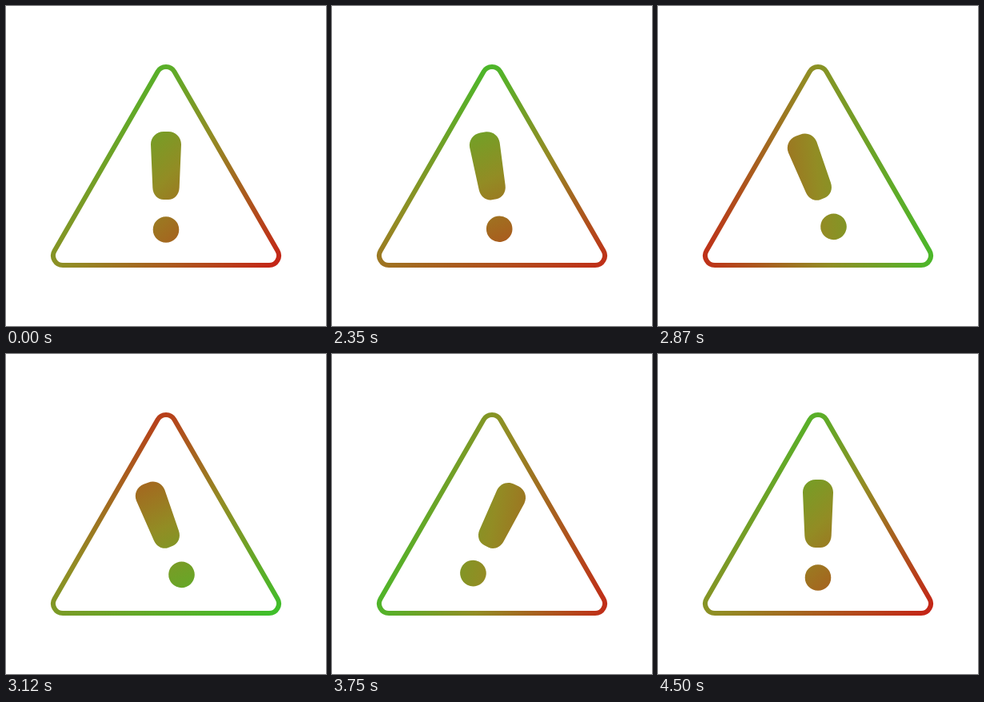
An HTML page with a canvas for the animation above (4.52 s loop, 400 by 400 pixels).

```html
<!DOCTYPE html>
<html lang="en">
<head>
<meta charset="utf-8">
<title>Warning</title>
<style>
  html, body { margin: 0; width: 100%; height: 100%; overflow: hidden; background: #fff; }
  canvas { display: block; width: 400px; height: 400px; }
</style>
</head>
<body>
<canvas id="stage" width="400" height="400"></canvas>
<script>
const ctx = document.getElementById('stage').getContext('2d');
const LOOP = 4520, START = 1995, LENGTH = 2500;
const CENTER = [200, 215], REACH = 182, PIVOT = [200, 226];

const triangle = new Path2D(
  'M71 324H329A12 12 0 0 0 339.4 306L210.4 82A12 12 0 0 0 189.6 82L60.6 306A12 12 0 0 0 71 324Z');
const mark = new Path2D(
  'M197 157H203C212 157 219 164 219 173L216.7 227C216.4 236 210 242 203 242' +
  'H197C190 242 183.6 236 183.3 227L181 173C181 164 188 157 197 157Z');
mark.moveTo(216.3, 279.5);
mark.arc(200, 279.5, 16.3, 0, 2 * Math.PI);

// Swing keys: [ms since the start, degrees]
const keys = [[0, 0]];
for (let i = 0; i < 8; i++) keys.push([158 + 250 * i, -30], [274 + 250 * i, 30]);
keys.push([2160, -16], [2290, 0], [LENGTH, 0]);

const smooth = t => t * t * (3 - 2 * t);

function swing(ms) {
  const i = keys.findIndex(key => key[0] >= ms);
  if (i < 1) return 0;
  const [t0, a0] = keys[i - 1], [t1, a1] = keys[i];
  return a0 + (a1 - a0) * smooth((ms - t0) / (t1 - t0));
}

// cubic-bezier(.4, 0, .4, 1)
function ease(x) {
  let low = 0, high = 1;
  for (let i = 0; i < 20; i++) {
    const s = (low + high) / 2;
    if (1.2 * s * (1 - s) + s ** 3 < x) low = s; else high = s;
  }
  return smooth(low);
}

function paint(degrees) {
  const a = degrees * Math.PI / 180, [x, y] = CENTER;
  const dx = REACH * Math.cos(a), dy = REACH * Math.sin(a);
  const gradient = ctx.createLinearGradient(x - dx, y - dy, x + dx, y + dy);
  gradient.addColorStop(0, 'rgb(48,200,44)');
  gradient.addColorStop(0.5, 'rgb(146,140,36)');
  gradient.addColorStop(1, 'rgb(199,31,22)');
  return gradient;
}

function draw(now) {
  const ms = Math.min(LENGTH, Math.max(0, now % LOOP - START));
  const turn = new DOMMatrix().translate(...PIVOT).rotate(swing(ms)).translate(-PIVOT[0], -PIVOT[1]);
  const tilted = new Path2D();
  tilted.addPath(mark, turn);

  ctx.fillStyle = '#fff';
  ctx.fillRect(0, 0, 400, 400);
  ctx.fillStyle = ctx.strokeStyle = paint(48 + 360 * ease(ms / LENGTH));
  ctx.lineWidth = 6;
  ctx.stroke(triangle);
  ctx.fill(tilted);
}

const begin = performance.now();
function tick() {
  draw(performance.now() - begin);
  requestAnimationFrame(tick);
}
tick();
</script>
</body>
</html>
```
